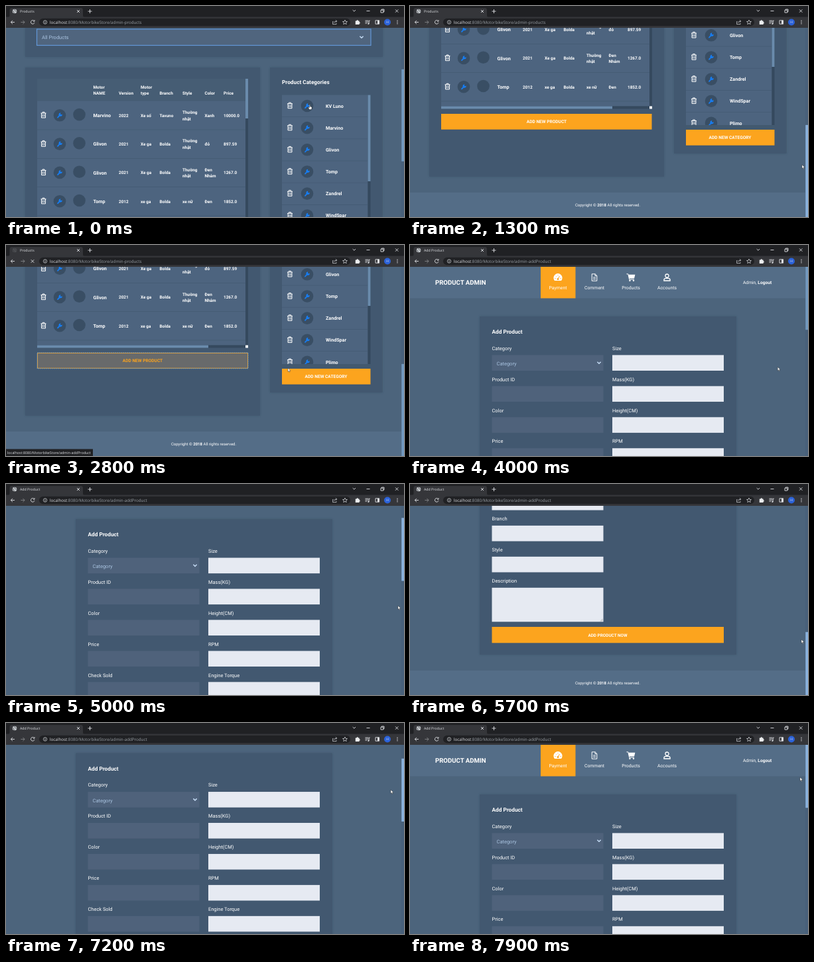
These frames come from a looping animation (600x319 px, 8000 ms). An HTML page:

```html
<!DOCTYPE html>
<html lang="en">
<head>
<meta charset="utf-8">
<title>Products</title>
<style>
html, body { margin: 0; height: 100%; overflow: hidden; background: #4c647c; }
svg { display: block; width: 100vw; height: 100vh; }
text { font-family: Roboto, sans-serif; fill: #fff; text-rendering: geometricPrecision; white-space: pre; }
.ui { font-family: "Open Sans", "Noto Sans", sans-serif; fill: #dfe1e5; }
.b { font-weight: 700; }
.m { text-anchor: middle; }
.soft { fill: #a9c3e0; }
.line { fill: none; stroke: #dfe1e5; stroke-width: .9; }
.w { fill: none; stroke: #fff; stroke-width: 1; }
</style>
</head>
<body>
<svg id="stage" viewBox="0 0 600 319"></svg>
<script>
const LOOP = 8000, LOADED = 3200, HOVER = 2200, CLICK = 2500;
const CARD = '#42596f', ROW = '#4d647f', ORANGE = '#fca41e', THUMB = '#6a8bac', DARK = '#35495e';

const rect = (x, y, w, h, fill, more = '') =>
  `<rect x="${x}" y="${y}" width="${w}" height="${h}" fill="${fill}" ${more}/>`;
const circle = (x, y, r, fill) => `<circle cx="${x}" cy="${y}" r="${r}" fill="${fill}"/>`;
const path = (d, cls = 'line', more = '') => `<path d="${d}" class="${cls}" ${more}/>`;
const at = (x, y, body) => `<g transform="translate(${x} ${y})">${body}</g>`;
// y is the middle of the line of text
const text = (x, y, size, s, cls = '') =>
  `<text x="${x}" y="${y + size * .355}" font-size="${size}" class="${cls}">${s}</text>`;
const card = (x, y, w, h) => rect(x, y, w, h, CARD, 'filter="url(#shade)"');

const trash = (x, y) => at(x, y,
  path('M-4-2.8H4M-1.5-3V-4.4H1.5V-3M-3-2.8V4.2H3V-2.8M-1.2-1V2.6M1.2-1V2.6', 'w', 'stroke-width=".9"'));
const wrench = (x, y) => circle(x, y, 9.3, '#394e64') + at(x, y,
  '<path d="M-3 3.2L.6-.6" stroke="#177df2" stroke-width="1.8" stroke-linecap="round"/>' +
  '<path d="M3.6-1.6A2.6 2.6 0 1 1 1.4-3.7L.9-1.7 1.8-1Z" fill="#177df2"/>');
const chevron = (x, y) => path(`M${x - 2.6} ${y - 1.3}l2.6 2.6 2.6-2.6`, 'w',
  'style="stroke:#c5dcf5;stroke-width:1.5"');

function productsPage() {
  const cols = [131.5, 170, 203, 231.5, 266, 299.5, 328];
  const heads = ['Motor|NAME', 'Version', 'Motor|type', 'Branch', 'Style', 'Color', 'Price'];
  const rows = [
    ['Marvino', '2022', 'Xe số', 'Tavuno', 'Thường|nhật', 'Xanh', '10000.0'],
    ['Glivon', '2021', 'Xe ga', 'Bolda', 'Thường|nhật', 'đỏ', '897.59'],
    ['Glivon', '2021', 'Xe ga', 'Bolda', 'Thường|nhật', 'Đen|Nhám', '1267.0'],
    ['Tomp', '2012', 'xe ga', 'Bolda', 'xe nữ', 'Đen', '1852.0']];
  const types = ['KV Luno', 'Marvino', 'Glivon', 'Tomp', 'Zandrel', 'WindSpar', 'Plimo'];
  const cell = (x, y, s, size) => {
    const parts = s.split('|');
    return parts.map((p, i) =>
      text(x, y + (i - (parts.length - 1) / 2) * 9.6, size, p, 'b')).join('');
  };

  let out = card(29, -80, 539, 157) +
    rect(46.5, 35, 503.5, 24.5, '#50657e', 'stroke="#6297d8" stroke-width="1.2"') +
    text(54, 47.5, 7.5, 'All Products', 'soft') + chevron(536, 47);

  out += card(29, 93, 354, 338) + rect(47, 110, 314, 33.5, '#465d74') +
    rect(47, 143.5, 314, 181, ROW);
  heads.forEach((h, i) => out += h.includes('|')
    ? cell(cols[i], 127.3, h, 6.4) : text(cols[i], 132, 6.4, h, 'b'));
  rows.forEach((r, i) => {
    const y = 165.3 + i * 43.3;
    out += rect(47, y + 21.4, 314, .7, '#435a72') + trash(56.5, y - .5) +
      wrench(81, y) + circle(110.5, y - 1.2, 9.3, '#394e64');
    r.forEach((s, j) => out += cell(cols[j], y + .2, s, j ? 6.4 : 7.2));
  });
  out += rect(361, 110, 4, 215, DARK) + rect(361, 110, 4, 60, THUMB) +
    rect(47, 324.5, 314, 4, DARK) + rect(47, 324.5, 258, 4, THUMB) +
    rect(361, 324.5, 4, 4, '#fff') +
    '<g id="add"></g>';

  out += card(398, 93, 169.5, 303) + text(416, 115, 8.25, 'Product Categories', 'b') +
    rect(416, 134.5, 129.5, 218.5, ROW);
  types.forEach((s, i) => {
    const y = 151 + i * 33.15;
    out += rect(416, y + 16.4, 129.5, .7, '#435a72') + trash(428, y - .5) + wrench(454, y) +
      text(482, y + .2, 7.15, s, 'b');
  });
  return out + rect(416, 353, 134, 8, CARD) + rect(545.5, 134.5, 4, 218.5, DARK) +
    rect(545.5, 134.5, 4, 130.5, THUMB) + rect(416, 360, 133.5, 23.7, ORANGE) +
    text(482.5, 372, 6.6, 'ADD NEW CATEGORY', 'b m') + footer(455);
}

function footer(y) {
  return rect(0, y, 600, 37, '#546d87') +
    text(298, y + 18.5, 6, 'Copyright © <tspan class="b">2018</tspan> All rights reserved.', 'm');
}

function formPage() {
  const left = ['Category', 'Product ID', 'Color', 'Price', 'Check Sold', 'Discount',
    'Quantity', 'Year', 'Image', 'Type', 'Branch', 'Style', 'Description'];
  const right = ['Size', 'Mass(KG)', 'Height(CM)', 'RPM', 'Engine Torque', 'Engine',
    'Fuel Tank', 'Power'];
  const tab = (x, s, icon) => at(x, 49, icon) + text(x, 65, 6.9, s, 'm');

  let out = rect(0, 33, 600, 47.5, '#546d87') + text(38, 57, 9.65, 'PRODUCT ADMIN', 'b') +
    rect(197, 33, 52.5, 47.5, ORANGE) +
    tab(223, 'Payment', '<path d="M-5 5A6.6 6.6 0 1 1 5 5Z" fill="#fff"/>' +
      circle(0, 2.6, 1.5, ORANGE) +
      path('M0 2.6L2.4-2M-4.6 1.4h1.2M3.4 1.4h1.2M-3.2-2.2l.8.8M0-4v1', 'w', `style="stroke:${ORANGE}"`)) +
    tab(278, 'Comment', path('M-3.8-5.2H1.2L3.8-2.6V5.2H-3.8ZM1-5V-2.4H3.6M-2 0H2M-2 2.4H2', 'w')) +
    tab(333, 'Products', '<path d="M-3.8-4.2H6.4L5 1.6H-2.6Z" fill="#fff"/>' +
      path('M-6.6-5.2H-4.2L-2.4 3H4.8', 'w') + circle(-1.6, 4.8, 1.2, '#fff') + circle(4, 4.8, 1.2, '#fff')) +
    tab(387.5, 'Accounts', path('M0-5A2.6 2.6 0 1 1 0 .2 2.6 2.6 0 1 1 0-5M-4.6 5V3.6Q-4.4 1.4-2 1.4H2Q4.4 1.4 4.6 3.6V5Z', 'w', 'style="stroke-width:1.3"')) +
    text(502, 57, 6.7, 'Admin, <tspan class="b">Logout</tspan>');

  out += card(105, 108, 387, 723) + text(123.5, 131.3, 8.25, 'Add Product', 'b');
  const field = (x, s, i, fill, h = 23.6) => {
    const y = 156 + i * 46.95;
    out += text(x, y, 7.45, s) + rect(x, y + 10.4, 168, h, fill);
  };
  left.forEach((s, i) => field(123.5, s, i, i < 5 ? '#4f627b' : '#e6eaf2', i == 12 ? 51.5 : 23.6));
  right.forEach((s, i) => field(305, s, i, '#e6eaf2'));
  return out + text(130.5, 179.3, 7.5, 'Category', 'soft') + chevron(285, 178) +
    path('M287 780.5l3.5-3.5M289 780.5l1.5-1.5', 'w', 'style="stroke:#777;stroke-width:.5"') +
    rect(123.5, 789, 349.5, 24.3, ORANGE) +
    text(298, 801.3, 6.4, 'ADD PRODUCT NOW', 'b m') + footer(855);
}

function browserBar() {
  const globe = circle(13, 8, 3.3, '#c3c7cb') +
    path('M10 7.2Q12 8 11.6 9.4T13 11M13.2 5Q12.6 7 14.2 7.4T16 8.6', 'line', 'style="stroke:#55585c"');
  return rect(0, 0, 600, 17, '#202124') +
    '<path d="M3 17Q5.5 17 5.5 14V6Q5.5 3 8.5 3H113Q116 3 116 6V14Q116 17 118.5 17Z" fill="#35363a"/>' +
    rect(0, 16.5, 600, 16.5, '#35363a') + rect(50, 18.7, 469, 11.6, '#202124', 'rx="5.8"') +
    `<g id="globe">${globe}</g><g id="tab"></g>` +
    path('M107 6l4 4M111 6l-4 4M126.5 5v6M123.5 8h6') +
    path('M522.7 6l2.2 2.2L527 6M543.5 7.5h5M565 6.2h3.8v3.8H565ZM566.2 6V5H570V8.8H569M587 5.3l4.4 4.4M591.4 5.3L587 9.7') +
    path('M13 24.5H7.4M10 21.8L7.3 24.5 10 27.2') +
    path('M22.4 24.5H28M25.4 21.8L28.1 24.5 25.4 27.2', 'line', 'style="stroke:#85878a"') +
    path('M42.4 22.6A2.8 2.8 0 1 0 42.9 25.2M43 21.2V23.2H41', 'line', 'id="reload"') +
    path('M37.7 22.2l4.6 4.6M42.3 22.2l-4.6 4.6', 'line', 'id="stop"') +
    '<circle cx="59" cy="24.5" r="2.7" class="line" style="stroke-width:.7"/>' +
    path('M59 24.2v1.8M59 22.8v.7', 'line', 'style="stroke-width:.8"') + '<g id="url"></g>' +
    path('M493.6 23.5H492.6V27.6H498V26M494.4 25.6Q494.8 23 498.6 23M497 21.2L498.8 23 497 24.8', 'line', 'style="stroke-width:.7"') +
    path('M511 21l1 2.4 2.5.2-1.9 1.6.6 2.5-2.2-1.4-2.2 1.4.6-2.5-1.9-1.6 2.5-.2Z', 'line', 'style="stroke-width:.7"') +
    '<path d="M526.8 22.5H528.6A1.2 1.2 0 0 1 531 22.5H532.6V24.2A1.2 1.2 0 0 1 532.6 26.6V28H526.8Z" fill="#eceef0"/>' +
    path('M541.5 22.2h5M541.5 24.2h5M541.5 26.2h2.8M547.2 27V22.2h1.6') + circle(546.4, 26.8, 1.1, '#dfe1e5') +
    path('M557 21.8h5.6v5.4H557Z') + rect(560, 21.8, 2.6, 5.4, '#dfe1e5') +
    circle(575, 24.5, 5, '#2b62d9') + text(575, 24.5, 5, 'H', 'ui m') +
    [22.2, 24.5, 26.8].map(y => circle(590, y, .7, '#dfe1e5')).join('');
}

const stage = document.getElementById('stage');
stage.innerHTML =
  '<filter id="shade" x="-5%" y="-5%" width="110%" height="110%">' +
  '<feDropShadow dx="0" dy="0" stdDeviation="1.5" flood-color="#2f4256" flood-opacity=".4"/></filter>' +
  rect(0, 0, 600, 319, '#4c647c') +
  `<g id="products">${productsPage()}</g><g id="form">${formPage()}</g>` +
  rect(596, 33, 4, 286, '#48607a') + rect(596.3, 33, 3.7, 10, '#85add8', 'id="thumb"') +
  browserBar() +
  `<g id="status">${rect(0, 308.5, 131, 10.5, '#202124')}` +
  text(2, 314, 5.36, 'localhost:8080/MotorbikeStore/admin-addProduct', 'ui') + '</g>' +
  '<g id="mouse"><path id="arrow" d="M0 0V5.6L1.3 4.4 2.2 6.4 3.1 6 2.2 4.1H4Z" fill="#fff" stroke="#222" stroke-width=".4"/>' +
  '<path id="hand" d="M-.6-2.6Q0-3.4.5-2.6V0L3 .7V3L2.2 4.6H-.6L-2.4 1.6-1.7 1-.6 1.9Z" fill="#fff" stroke="#222" stroke-width=".4"/></g>';

const $ = id => document.getElementById(id);
const show = (id, on) => $(id).setAttribute('display', on ? 'inline' : 'none');
const move = (id, x, y) => $(id).setAttribute('transform', `translate(${x} ${y})`);
const cache = {};
const fill = (id, html) => { if (cache[id] !== html) $(id).innerHTML = cache[id] = html; };

// keys: [time, value, ...], straight lines between them
function track(keys, t, n = 1) {
  let i = keys.findIndex(k => k[0] > t);
  if (i < 0) return keys[keys.length - 1][n];
  if (i == 0) return keys[0][n];
  const a = keys[i - 1], b = keys[i];
  return a[n] + (b[n] - a[n]) * (t - a[0]) / (b[0] - a[0]);
}

const mouse = [[0, 458, 152], [200, 458, 152], [600, 588, 180], [1150, 591, 240], [1500, 591, 240],
  [2200, 340, 177], [2550, 340, 177], [2800, 425, 186], [3300, 425, 186], [4200, 591, 184],
  [5100, 591, 184], [5700, 590, 235], [6200, 590, 235], [6400, 590, 215], [7200, 580, 101],
  [7600, 588, 82]];
const listScroll = [[550, 0], [750, 50], [1000, 150], [1150, 173]];
const formScroll = [[4850, 0], [5000, 54], [5600, 573], [6200, 573], [6400, 525], [7200, 62.5], [7600, 0]];

function draw(now) {
  const t = now % LOOP, form = t >= LOADED, loading = t >= CLICK && !form;
  const hover = t >= HOVER && !form;
  const x = track(mouse, t), y = track(mouse, t, 2);
  const scroll = form ? track(formScroll, t) : track(listScroll, t);
  const ratio = 286 / (form ? 859 : 588);

  show('products', !form);
  show('form', form);
  move(form ? 'form' : 'products', 0, -scroll);
  $('thumb').setAttribute('y', 33 + (scroll + (form ? 0 : 129)) * ratio);
  $('thumb').setAttribute('height', 286 * ratio);
  $('thumb').setAttribute('fill', x > 575 ? '#8ab2de' : '#7299c0');

  fill('add', (hover
    ? rect(47.5, 336.3, 317, 23, '#686a6b', `stroke="${ORANGE}"`) +
      (loading ? rect(47, 335.8, 318, 24, 'none', 'stroke="#4d97ea" stroke-width=".8" stroke-dasharray="2 1"') : '')
    : rect(47, 336, 317.5, 23.7, ORANGE)) +
    `<g${hover ? ' style="--c:1"' : ''}>` +
    text(206, 348, 6.6, hover ? `<tspan fill="${ORANGE}">ADD NEW PRODUCT</tspan>` : 'ADD NEW PRODUCT', 'b m') + '</g>');
  fill('tab', text(21, 8.2, 5.25, form ? 'Add Product' : 'Products', 'ui'));
  fill('url', text(66, 24.5, 6.26, 'localhost<tspan fill="#9aa0a6">:8080/MotorbikeStore/admin-' +
    (form ? 'addProduct' : 'products') + '</tspan>', 'ui'));
  $('globe').setAttribute('opacity', loading ? .15 : 1);
  show('stop', loading);
  show('reload', !loading);
  show('status', hover);

  const hand = t < 300 || (t >= HOVER && t < 2650);
  show('hand', hand);
  show('arrow', !hand);
  move('mouse', x, y);
}

function tick() {
  draw(performance.now());
  requestAnimationFrame(tick);
}
tick();
</script>
</body>
</html>
```
